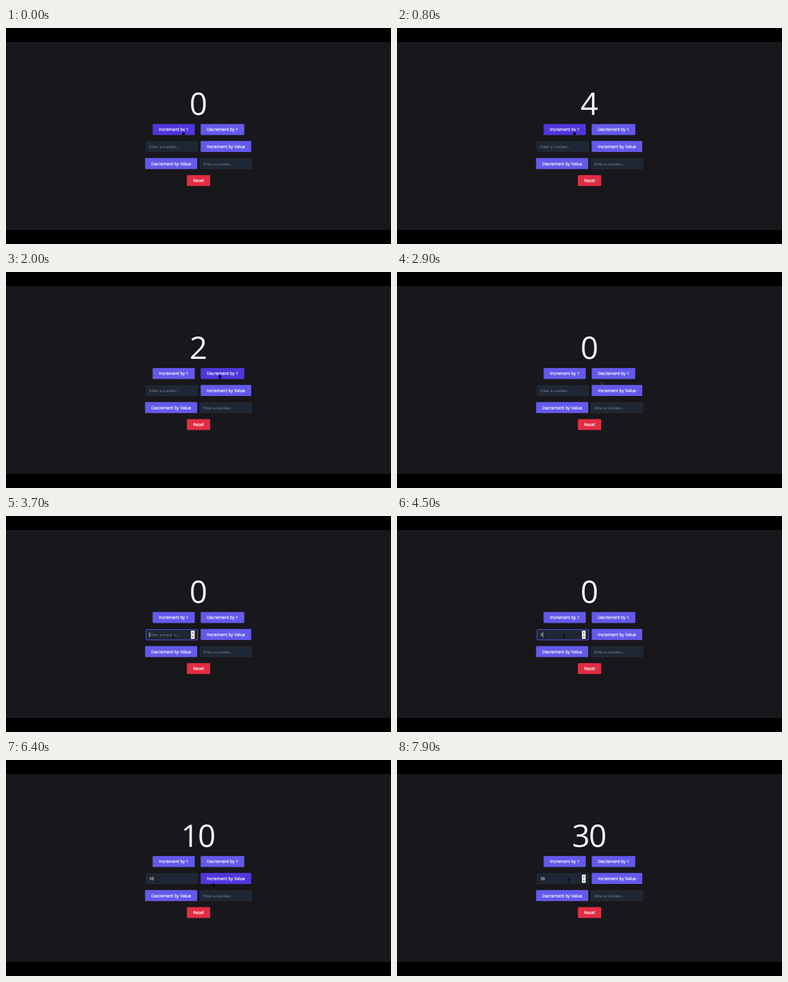
An HTML page for the animation above (8 s loop, 600 by 338 pixels).

```html
<!DOCTYPE html>
<html lang="en">
<head>
<meta charset="utf-8">
<title>Counter</title>
<style>
  html, body { margin: 0; width: 100%; height: 100%; overflow: hidden; background: #000; }
  svg { display: block; width: 100vw; height: 100vh; }
  text { font-family: "Open Sans", "Noto Sans", sans-serif; text-rendering: geometricPrecision; }
  .count { font-size: 48.5px; letter-spacing: -1.5px; text-anchor: middle; fill: #f7f6f8; }
  .label { font-size: 6.65px; text-anchor: middle; fill: #fff; stroke: #fff; stroke-width: .2; }
  .button { fill: #6459ea; }
  .button.hover { fill: #4f37dd; }
  .reset { fill: #e22d43; }
  .field { fill: #1e2733; stroke: #2a333f; stroke-width: .6; }
  .field.focus { stroke: #4f46cf; stroke-width: 1.2; }
  .value { font-size: 6.3px; fill: #fff; stroke: #fff; stroke-width: .15; }
  .value.hint { font-size: 5.8px; fill: #87909c; stroke: none; }
</style>
</head>
<body>
<svg viewBox="0 0 600 338">
  <rect width="600" height="338"/>
  <rect y="22" width="600" height="294" fill="#18171b"/>
  <text id="count" class="count" x="299.1" y="136.2">0</text>
  <g id="controls"></g>
  <g id="spinner">
    <rect x="288.2" y="179.4" width="5.8" height="12.8" fill="#f2f2f2"/>
    <path d="M289.7 183.6l1.4-1.8 1.4 1.8zM289.7 188l1.4 1.8 1.4-1.8z" fill="#333"/>
    <path d="M288.2 185.8h5.8" stroke="#bbb" stroke-width=".5"/>
  </g>
  <rect id="caret" y="181.8" width=".7" height="7.8" fill="#e8eaee"/>
  <g id="cursors">
    <path id="arrow" d="M0 0v4.6l1.1-1 .8 1.7.8-.4-.8-1.6h1.5z" fill="#111" stroke="#77757c" stroke-width=".4"/>
    <path id="hand" d="M-.6 0h1.2v2.2l2.1.6v2.4l-.7 1.6h-2.5l-1.6-2.4.6-.5.9.7z" fill="#0b0a14"/>
    <path id="beam" d="M-1.8-2.3h3.6M0-2.3v5.4M-1.3 3.1h2.6" fill="none" stroke="#05070a" stroke-width="1.1"/>
  </g>
</svg>
<script>
const LOOP = 8000, STEP = 100, BLINK = 530;
const HINT = 'Enter a number...';
const FOCUS = 3500, BLUR = 6200;
const typing = { first: 4500, gap: 300, n: 2 };

// Bursts of clicks, each adding `by` to the counter
const bursts = [
  { first: 70, gap: 230, n: 5, by: 1 },
  { first: 1600, gap: 200, n: 4, by: -1 },
  { first: 2600, gap: 200, n: 1, by: -1 },
  { first: 6300, gap: 550, n: 3, by: 10 }
];

// The pointer rests between moves
const home = { x: 276, y: 161 };
const moves = [
  { from: 1100, to: 1300, x: 333, y: 160 },
  { from: 2800, to: 2900, x: 318.5, y: 172 },
  { from: 2900, to: 3200, x: 260.5, y: 188 },
  { from: 5300, to: 6200, x: 322.5, y: 192 },
  { from: 7600, to: 7900, x: 267, y: 188 }
];

const $ = id => document.getElementById(id);
const clamp = (v, lo, hi) => Math.min(hi, Math.max(lo, v));
const show = (el, on) => el.setAttribute('visibility', on ? 'visible' : 'hidden');
const presses = ({ first, gap, n }, t) => clamp(Math.floor((t - first) / gap) + 1, 0, n);

function add(tag, attrs, text = '') {
  const el = document.createElementNS('http://www.w3.org/2000/svg', tag);
  for (const key in attrs) el.setAttribute(key, attrs[key]);
  el.textContent = text;
  return $('controls').appendChild(el);
}

function control(kind, row, x, w, text) {
  const isField = kind === 'field';
  const y = 150.2 + 26.65 * row + (isField ? 0.8 : 0);
  const h = isField ? 16.2 : 17.2;
  const box = add('rect', { class: kind, x, y, width: w, height: h, rx: 1.3 });
  const label = isField
    ? add('text', { class: 'value hint', x: x + 5, y: y + 10.4 }, text)
    : add('text', { class: 'label', x: x + w / 2, y: y + 11 }, text);
  const contains = p => p.x >= x && p.x <= x + w && p.y >= y && p.y <= y + h;
  return { kind, box, label, contains };
}

const addField = control('field', 1, 218.2, 80.4, HINT);
const controls = [
  addField,
  control('button', 0, 228.5, 65.7, 'Increment by 1'),
  control('button', 0, 303.4, 68, 'Decrement by 1'),
  control('button', 1, 303.4, 78.8, 'Increment by Value'),
  control('button', 2, 216.7, 81.3, 'Decrement by Value'),
  control('field', 2, 302.4, 80.6, HINT),
  control('reset', 3, 281.8, 36.4, 'Reset')
];

function pointerAt(t) {
  return moves.reduce((p, m) => {
    const k = clamp((t - m.from) / (m.to - m.from), 0, 1);
    return { x: p.x + (m.x - p.x) * k, y: p.y + (m.y - p.y) * k };
  }, home);
}

function caretOn(t, typed) {
  const last = typed ? typing.first + (typed - 1) * typing.gap : FOCUS;
  return Math.floor((t - last) / BLINK) % 2 === 0;
}

function draw(t) {
  const typed = presses(typing, t);
  const focused = t >= FOCUS && t < BLUR;
  const pointer = pointerAt(t);
  const over = controls.find(c => c.contains(pointer));

  $('count').textContent = bursts.reduce((sum, b) => sum + b.by * presses(b, t), 0);
  for (const c of controls) c.box.classList.toggle('hover', c === over);

  addField.box.classList.toggle('focus', focused);
  addField.label.textContent = '10'.slice(0, typed) || HINT;
  addField.label.classList.toggle('hint', !typed);
  show($('spinner'), focused || over === addField);
  $('caret').setAttribute('x', 223.4 + typed * 3.5);
  show($('caret'), focused && caretOn(t, typed));

  const shape = !over ? 'arrow' : over.kind === 'field' ? 'beam' : 'hand';
  for (const el of $('cursors').children) show(el, el.id === shape);
  $('cursors').setAttribute('transform', `translate(${pointer.x} ${pointer.y})`);
}

const begin = performance.now();
function frame() {
  const t = (performance.now() - begin) % LOOP;
  draw(Math.floor(t / STEP) * STEP);
  requestAnimationFrame(frame);
}
frame();
</script>
</body>
</html>
```
